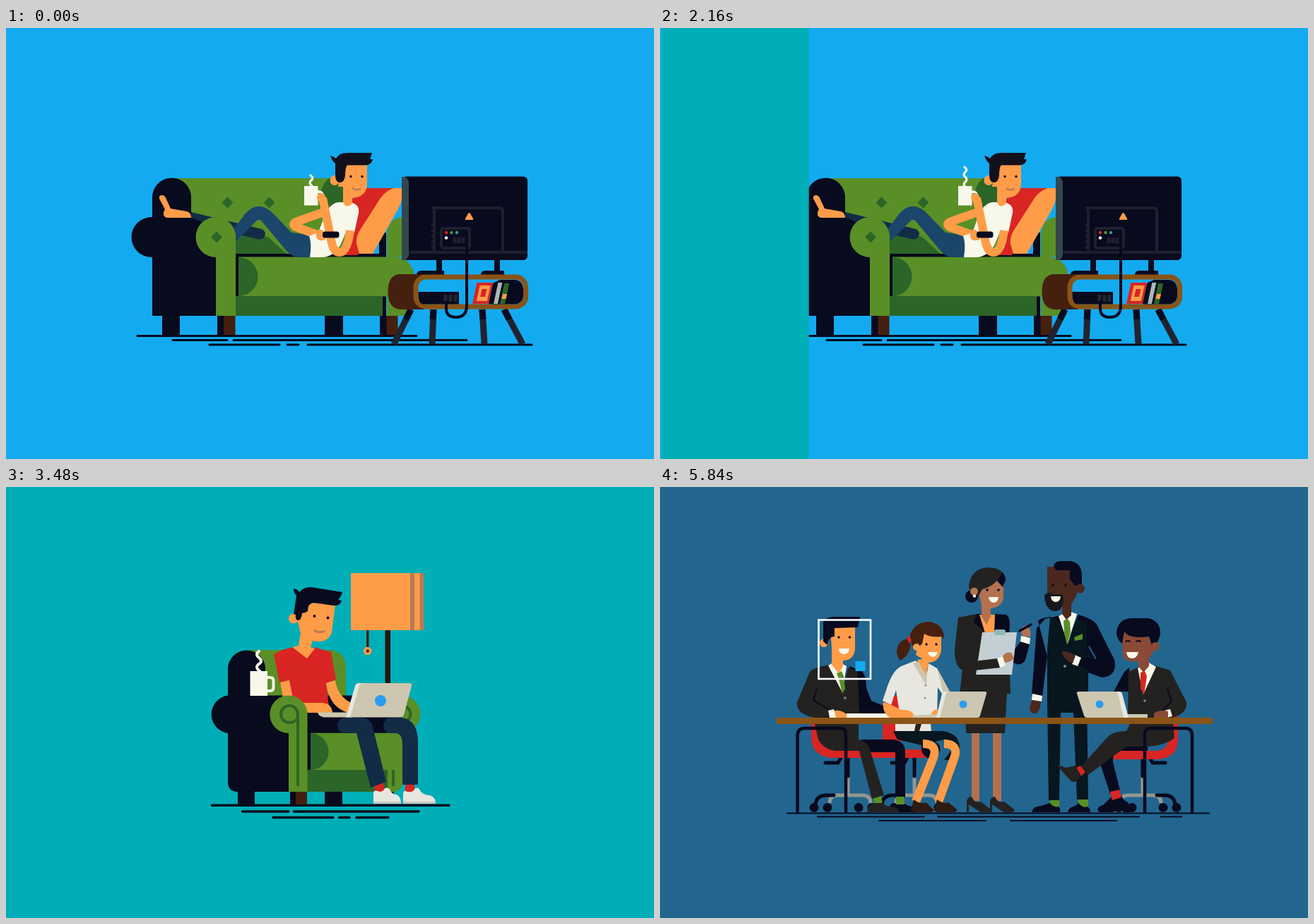
These frames come from a looping animation (917x611 px, 7960 ms). An HTML page:

```html
<!DOCTYPE html>
<html lang="en">
<head>
<meta charset="utf-8">
<title>From sofa to office</title>
<style>
html, body { margin: 0; width: 100%; height: 100%; overflow: hidden; }
svg { position: absolute; inset: 0; width: 100%; height: 100%; }
#sofa { background: #14aaf0; }
#chair { background: #00aeb8; }
#office { background: #22658f; }
.navy { fill: #080a1e; } .green { fill: #5a8f27; } .moss { fill: #2c6528; }
.skin { fill: #ff9c48; } .red { fill: #d92523; } .white { fill: #f8f8ea; }
.jeans { fill: #1a466b; } .denim { fill: #122c46; } .coal { fill: #232220; }
.brown { fill: #46200f; } .wood { fill: #8a5416; } .tan { fill: #cdc6b0; }
.pale { fill: #e7e7df; } .blue { fill: #2a9df0; } .teal { fill: #07161f; }
.umber { fill: #b4714f; } .cocoa { fill: #4a281e; } .rust { fill: #8a4a36; }
.line { fill: none; stroke: #080a1e; stroke-linecap: round; stroke-linejoin: round; }
.skinline { fill: none; stroke: #ff9c48; stroke-linejoin: round; }
.steam { fill: none; stroke: #f8f8ea; stroke-linecap: round; }
</style>
</head>
<body>

<svg id="sofa" viewBox="0 0 917 611" preserveAspectRatio="none">
  <path class="line" stroke-width="3" d="M186 436.500H581M236 442.500H313M322 442.500H652M288 449H387M398 449H414M427 449H744"/>
  <!-- sofa -->
  <path class="green" d="M235 213H455Q480 218 480 245V322H235Z"/>
  <path class="moss" d="M457 213Q441 226 444 262H482V240Q478 213 457 213Z"/>
  <path class="moss" d="M313.500 239.500l8 8-8 8-8-8ZM372.500 239.500l8 8-8 8-8-8ZM262 262L330 281 372 297 398 321H325Z"/>
  <path class="navy" d="M207 268V240a27.500 27.500 0 0 1 55 0V268ZM206 268H297V408H207V325H206a28 28 0 0 1 0-57ZM221 408h25v28h-25ZM299 408h10v28h-10ZM451 408h26v28h-26ZM529 408h10v28h-10Z"/>
  <path class="brown" d="M308.500 408h16v27h-16ZM538.500 408h16v27h-16Z"/>
  <path class="green" d="M539 408V290Q543 268 562 268H585V324L549 324a28 28 0 0 1 21 47V408Z"/>
  <path class="navy" d="M325 320H528V290H538V408H325Z"/>
  <path class="green" d="M329 324.500H549a28 28 0 0 1 0 56H329Z"/>
  <path class="moss" d="M329 325a27 27 0 0 1 0 55ZM325 380H533V408H325Z"/>
  <!-- pillows -->
  <path class="red" d="M478 322L488 244 508 227H560L530 255 498 322Z"/>
  <path class="skin" d="M560 227H549Q538 230 530 241L500 288Q495 297 496 306L500 320H519L553 260Q559 250 560 242Z"/>
  <!-- legs and feet -->
  <path class="denim" d="M262 261L362 285Q369 289 366 295 363 301 355 299L325 292 262 269Z"/>
  <path class="skin" d="M217 242Q216 237 221 237 225 237 227 243L233 256 256 260Q262 262 262 269H230Q222 269 223 261L225 257Z"/>
  <path class="jeans" d="M320 288L338 264Q357 242 378 263L404 290 433 294V325H418Q406 326 397 316L362 274Q358 269 353 275L322 306Z"/>
  <path class="green" d="M297 268a28 28 0 0 1 28 28V408H297V325a28 28 0 0 1 0-57Z"/>
  <path class="moss" d="M298 288.500l8 8-8 8-8-8Z"/>
  <!-- upper body -->
  <path class="skinline" stroke-width="12" d="M455 259L410 275Q404 278 410 282L446 295"/>
  <path class="white" d="M470 247H487Q501 250 499 262L493 290 482 287 474 306Q464 325 447 325H430Q433 306 429 295L442 290 452 263Q459 249 470 247Z"/>
  <path class="skinline" stroke-width="12" d="M487 287Q483 318 472 318 463 318 460 300L448 241"/>
  <path class="skin" d="M439 290Q440 285 446 286L452 290V300Q440 304 439 295Z"/>
  <rect class="navy" x="448" y="288.500" width="23.500" height="9" rx="3.500"/>
  <path id="sofaSteam" class="steam" stroke-width="3.200" d="M431 0q5 3.500 1 7t0 7 0 7 0 7 0 7"/>
  <path class="white" d="M422 224H441.500V251.500H422ZM441 230Q450 230 450 238L445 234H441Z"/>
  <circle class="skin" cx="446" cy="240" r="6"/>
  <!-- head -->
  <path class="skin" d="M474 194H511V223Q509 240 490 241V249Q481 257 477 247V225H470Z"/>
  <ellipse class="skin" cx="465" cy="216" rx="6.500" ry="7"/>
  <path fill="#13101d" d="M459 181Q464 182 467 185 472 176 485 177H518L515 186H519Q517 195 508 194.500H483Q480 197 480 209 479 219 472 219 466 219 466 208V192Q461 188 459 181Z"/>
  <circle class="navy" cx="488" cy="210.500" r="1.700"/><circle class="navy" cx="504" cy="210.500" r="1.700"/>
  <path fill="none" stroke="#b87858" stroke-width="2.200" d="M490 227Q497 232 502 227"/>
  <!-- television -->
  <path class="navy" d="M609 328h8v17h-8ZM691 328h8v17h-8ZM581 350Q581 344 588 344H620V350ZM672 350Q672 344 678 344H705V350Z"/>
  <rect class="navy" x="560" y="210.500" width="178" height="118.500" rx="6"/>
  <path fill="#33474d" d="M560 211H566L570 217V323L566 329H560Z"/>
  <g fill="none" stroke="#1f1f2d" stroke-width="4">
    <path d="M570 318H738M606 318V255H698Q703 255 703 260V318M602 255H612"/>
    <path stroke-dasharray="4 4" d="M604 277V316"/>
    <rect x="616" y="284" width="40" height="28" rx="3"/>
    <path stroke-width="5" d="M635 297V305M641 297V305M647 297V305"/>
  </g>
  <circle class="red" cx="623" cy="290" r="2.300"/><circle class="green" cx="630.500" cy="290" r="2.300"/>
  <circle fill="#3c91a5" cx="638" cy="290" r="2.300"/><circle class="white" cx="623" cy="297.500" r="2.300"/>
  <path class="skin" d="M654 263Q655.500 261 657 263L661 270Q662 272 659 272H652Q649 272 650 270Z"/>
  <!-- stand -->
  <g fill="none" stroke="#20232f" stroke-width="9">
    <path d="M573 399L549 448M605 399L603 448M674 399L677 448M705 399L731 448"/>
    <path stroke="#080a1e" d="M573 399L566 413M605 399L604 413M674 399L675 413M705 399L712 413"/>
  </g>
  <path class="brown" d="M556 349H592V399H560Q541 399 540.500 375 540 351 556 349Z"/>
  <rect x="580" y="353" width="155.500" height="42" rx="14" fill="#14aaf0" stroke="#8a5416" stroke-width="7"/>
  <path class="navy" d="M583.500 374H641V391.500H590Q583 391 583.500 374ZM690 361L699 357H721Q731 358 732 370V380Q731 391 720 391.500H684Z"/>
  <path d="M622 378V388M629 378V388M636 378V388" stroke="#24252e" stroke-width="5"/>
  <g transform="translate(660 391) skewX(-12)">
    <path class="red" d="M0 0V-30H23V0Z"/><path class="skin" d="M5-4V-26H20V-4Z"/><path class="red" d="M9-10V-21H16V-10Z"/>
    <path class="navy" d="M23 0V-28H30V0Z"/><path fill="#a7b8b5" d="M30 0V-30H36V0Z"/>
    <path class="navy" d="M36 0V-26H39V0Z"/><path class="moss" d="M39 0V-29H46V0Z"/><path class="skin" d="M40-7V-14H46V-7Z"/>
  </g>
  <path class="line" stroke-width="4" d="M652 310V393Q652 410 637 410 623 410 623 398V388"/>
</svg>

<svg id="chair" viewBox="0 0 917 611" preserveAspectRatio="none">
 <g class="art">
  <path class="line" stroke-width="3.500" d="M291.500 451.300H627M334.500 460H400M407.500 460H584M378 468.500H463M471.500 468.500H486M496 468.500H541"/>
  <!-- lamp -->
  <path class="skin" d="M488 122H591V203H488Z"/>
  <path fill="#b87858" d="M572 122h6v81h-6ZM585.500 122h6v81h-6Z"/>
  <path fill="#21180f" d="M536.500 203h7.500v77h-7.500Z"/>
  <path class="brown" d="M510 203h3.500v25h-3.500Z"/>
  <circle cx="511.800" cy="232.500" r="4" fill="#46200f" stroke="#ff9c48" stroke-width="3.500"/>
  <!-- armchair -->
  <path class="green" d="M345 231H457Q481 232 481 257V320H345Z"/>
  <path class="navy" d="M314 258a26.500 26.500 0 0 1 53 0V295.500H490V295H540V401H431V432H328Q314 432 314 418V349a27 27 0 0 1 0-53.500ZM328 432h24v18h-24ZM402 432h9v18h-9ZM451 432h25v18h-25Z"/>
  <path class="brown" d="M410 432h16v18h-16ZM540 432h9v14h-9Z"/>
  <path class="green" d="M560 295.500a26.500 26.500 0 0 1 0 53H561V418Q560 432 547 432H540V349H431V401H540V295Z"/>
  <path class="green" d="M431 348.500H545V402H431Z"/>
  <circle cx="561" cy="322" r="11.500" fill="none" stroke="#2c6528" stroke-width="4"/>
  <path class="moss" d="M431 349a25.500 26 0 0 1 0 52ZM426 401H540V432H426ZM546 401h4v23h-4Z"/>
  <path class="navy" d="M426 319H560V348.500H426Z"/>
  <!-- torso and arms -->
  <path class="red" d="M379 237Q393 229 407 227L425 242 436 227 460 234 467 273 453 278 458 320H405L401 274 387 277Z"/>
  <path class="skin" d="M388 277L401 274 407 306H448Q461 307 462 320H420L392 298ZM453 278L466 274Q469 296 488 306L484 320Q457 312 453 278ZM405 227L414 225 418 200 434 217 431 227 437 229 426 243Z"/>
  <!-- head -->
  <path class="skin" d="M428 164L466 166 461 206Q456 221 437 219L418 212 412 188Z"/>
  <circle class="skin" cx="407" cy="186.500" r="7"/>
  <path class="navy" d="M407 144Q413 145 415 149 422 141 432 142L476 149Q474 156 470 160L475 161Q473 169 463 168L435 164Q427 165 427 176 423 179 419 179 418 189 413 189 409 188 410 181L407 180 411 154Q407 150 407 144Z"/>
  <circle class="navy" cx="436.500" cy="183" r="2"/><circle class="navy" cx="455.500" cy="185.500" r="2"/>
  <path fill="none" stroke="#b87858" stroke-width="3" d="M436 203Q443 208 451 204"/>
  <!-- legs -->
  <path class="red" d="M521 423L534 419 536 434H523ZM565 421h13v14h-13Z"/>
  <path class="denim" d="M480 327H502Q515 327 519 340L538 418 516 426 496 349H480a11 11 0 0 1 0-22ZM545 327H560Q583 330 583 362V422H561V365Q561 349 551 349H545a11 11 0 0 1 0-22Z"/>
  <path id="shoe" class="pale" d="M520 449V434Q520 429 526 431 533 434 536 427 541 425 544 430 545 435 552 436 559 438 559 449Z"/>
  <path class="pale" d="M562 449V434Q563 429 568 432 576 434 579 427 584 425 587 432 592 437 600 437 608 440 608 449Z"/>
  <path fill="#cbc7bb" d="M520 446h39v3h-39ZM562 446h46v3h-46Z"/>
  <!-- laptop -->
  <path class="tan" d="M441 319.500H486V326.500H450Q442 325 441 319.500Z"/>
  <path class="pale" d="M481 326.500L494 282Q495 278 500 278H506L490 326.500Z"/>
  <path class="tan" d="M487 326.500L500 282Q501 278 505 278H571Q575 278 574 282L563 323Q562 326.500 558 326.500Z"/>
  <circle class="blue" cx="530" cy="303" r="8"/>
  <path class="green" d="M400 295.500a26.500 26.500 0 0 1 26.500 26.500V432H400V349a26.500 26.500 0 0 1 0-53.500Z"/>
  <path fill="none" stroke="#2c6528" stroke-width="4" d="M413 424V322a12 12 0 1 0-12 12q8 0 12-7"/>
  <path id="chairSteam" class="steam" stroke-width="4" d="M358 2q-6 4 0 9t0 9 0 9 0 7"/>
  <path class="white" d="M345.500 261H370V296H345.500Z"/>
  <path fill="none" stroke="#f8f8ea" stroke-width="4" d="M370 270H374Q378.500 270 378.500 275V284Q378.500 289 374 289H370"/>
  <use id="ghostSteam" href="#chairSteam"/>
 </g>
</svg>

<svg id="office" viewBox="0 0 917 611" preserveAspectRatio="none">
 <g class="art">
  <path class="line" stroke-width="2" d="M180 462.500H777M223 467.500H374M393 467.500H678M708 467.500H738M310 473H461M496 473H646"/>
  <!-- swivel chairs -->
  <g id="base">
    <path fill="none" stroke="#94988f" stroke-width="5" d="M266 408V436M240 448Q240 437 252 437H286Q298 437 298 448"/>
    <path class="line" stroke-width="5" d="M266 384V410M234 391H252L258 380M220 452Q220 438 234 437H246"/>
    <circle class="navy" cx="218" cy="454.500" r="6.500"/><circle class="navy" cx="237" cy="454.500" r="6.500"/>
    <circle class="navy" cx="281" cy="454.500" r="6.500"/><circle class="navy" cx="300" cy="454.500" r="6.500"/>
  </g>
  <use href="#base" transform="translate(94 0)"/>
  <use href="#base" transform="matrix(-1 0 0 1 949 0)"/>
  <path class="red" d="M214 310Q216 296 226 296H234V350Q232 372 250 372H378V384H242Q214 380 214 355ZM315 358V310Q320 296 332 296H342V360ZM733 310Q732 297 722 296V350Q720 372 704 374H644Q634 377 638 386H705Q733 383 733 358Z"/>
  <!-- man at the left -->
  <path class="navy" d="M268 254L286 261Q292 268 292 285L299 303 326 314V327H276ZM285 358H330Q347 360 347 376V441H333V376H285ZM325 461Q325 451 334 449H347Q350 453 360 453 372 454 373 461Z"/>
  <path class="green" d="M302 439L313 436 315 451H303ZM334 439h12v11h-12Z"/>
  <path class="coal" d="M219 336H281V358Q294 360 298 375L317 437 300 442 282 374H248Q232 372 224 358ZM293 461Q294 451 302 448H314Q320 453 328 453 338 454 339 461ZM212 262Q216 256 240 252L258 290 266 256 280 262 282 327H219Q192 322 194 305Z"/>
  <path fill="none" stroke="#080a1e" stroke-width="2" d="M222 286L217 302 238 315"/>
  <path class="white" d="M238 253L250 246 264 254 258 291Z"/>
  <path class="green" d="M250 264L257 261 260 268 262 286 258 293 253 272Z"/>
  <path class="skin" d="M241 199H276V230Q274 246 259 246V254L253 264 243 252V230ZM244 318Q254 314 264 322V327H244Z"/>
  <circle class="skin" cx="232" cy="221" r="6"/>
  <path class="navy" d="M231 191Q236 184 247 184H283L280 199 247 200V212Q238 212 237 224L231 219Z"/>
  <circle class="navy" cx="253" cy="213" r="1.800"/><circle class="navy" cx="268.500" cy="213" r="1.800"/>
  <path class="white" d="M253 229H268Q267 237 260 237 254 237 253 229ZM238 317L246 315 249 327H240ZM264 321H332V327H264Z"/>
  <circle cx="262" cy="299" r="2" fill="#777"/>
  <!-- seated woman -->
  <path class="skinline" stroke-width="12" d="M402 364Q424 364 416 385L394 446M372 364Q395 364 386 386L362 446"/>
  <path class="teal" d="M330 346H400Q424 349 424 370 423 387 402 387L413 372Q412 360 402 358L370 366 336 358Z"/>
  <path class="navy" d="M370 366Q378 360 386 360 398 364 396 374L391 387Q374 386 370 374Z"/>
  <path class="skinline" stroke-width="12" d="M372 364Q395 364 386 386L362 446M402 364Q424 364 416 385L394 446"/>
  <path fill="#2d1a10" d="M355 459L359 443Q368 450 375 447L387 457Q388 461 382 461H362ZM388 459L392 443Q402 450 408 447L420 457Q421 461 415 461H395Z"/>
  <path class="pale" d="M333 336H383L384 346H333ZM344 253L362 246 377 268 380 250 392 257 411 292 402 297 393 284 392 327H340L334 288 327 309 315 303 322 282Q331 257 344 253Z"/>
  <path class="coal" d="M362 336h8l-3 10h-7Z"/>
  <path class="tan" d="M358 250L366 247 378 262 377 282ZM392 257L397 266 411 292 402 297Z"/>
  <path class="skin" d="M316 305L327 309 342 316Q359 315 360 327H325Q314 319 316 305ZM384 321Q386 315 395 315V327H384ZM364 245L378 243 380 250 376 266Z"/>
  <path class="skin" d="M370 206H398V232Q395 248 380 249L362 238Z"/>
  <path class="brown" d="M354 209Q361 191 381 191 402 194 402 215L398 212Q384 214 374 208L371 222 363 230Q354 226 354 209ZM351 215Q337 217 335 232 335 241 340 246 352 240 355 224Z"/>
  <path class="red" d="M349 214l3-3 4 6-3 5Z"/>
  <circle class="skin" cx="363" cy="227" r="5"/>
  <circle class="navy" cx="377" cy="223" r="1.700"/><circle class="navy" cx="391" cy="223" r="1.700"/>
  <path class="white" d="M379 234H393Q391 241 386 241 380 240 379 234Z"/>
  <circle cx="376" cy="281" r="1.600" fill="#999"/><circle cx="375" cy="299" r="1.600" fill="#999"/>
  <!-- standing woman -->
  <path class="umber" d="M441 347H452V445H441ZM471 347H483V445H471Z"/>
  <path id="heel" class="coal" d="M434 461V446Q435 439 441 439 445 449 454 446L468 457Q470 461 464 461H453Q443 454 437 450V461Z"/>
  <use href="#heel" x="33"/>
  <path class="coal" d="M431 290H491L488 349H433ZM422 185L448 180 462 206 476 181 492 184 496 293H424L428 258Q417 250 417 230Z"/>
  <path class="navy" d="M474 180L490 181Q495 184 495 195L494 212 500 233 510 219 523 223 517 245Q512 253 505 251L490 245 462 206ZM448 180L444 192 462 207 455 180Z"/>
  <path class="skin" d="M452 181L474 181 473 207H460Z"/>
  <path class="umber" d="M449 140L486 132V156Q485 170 468 172V183L462 195 455 183V168Z"/>
  <path class="navy" d="M470 115Q489 118 489 132L485 142 478 134Z"/>
  <circle class="navy" cx="441" cy="155" r="9"/>
  <path class="coal" d="M437 143Q438 116 464 114 479 114 484 121 476 140 456 145L450 156 441 148Z"/>
  <circle class="umber" cx="444.500" cy="148" r="5.500"/><circle class="white" cx="445" cy="154.500" r="2.200"/>
  <circle class="navy" cx="463" cy="146" r="1.800"/><circle class="navy" cx="479" cy="146" r="1.800"/>
  <path class="white" d="M465 156H479Q478 164 472 164 466 163 465 156ZM511 211L524 214 523 223 510 219Z"/>
  <path fill="#c3cfd2" d="M456 206H505L498 266H447Z"/>
  <rect fill="#8fb9b9" x="473" y="202" width="16" height="8" rx="3"/>
  <path class="coal" d="M417 232Q417 262 436 261L482 256 478 243 444 247 440 215Z"/>
  <path class="white" d="M477 243L485 240 489 253 481 256Z"/>
  <path class="umber" d="M485 240Q490 233 497 235L501 243Q497 248 488 249ZM510 204Q512 197 519 196 526 202 524 212H514Z"/>
  <path class="line" stroke-width="3.500" d="M509 204L525 195"/>
  <!-- standing man -->
  <path class="green" d="M552 441h13v14h-13ZM592 441h14v14h-14Z"/>
  <path class="navy" d="M526 461Q527 453 539 452L552 448Q557 455 564 453 567 456 566 461ZM577 461Q578 454 588 452L592 448Q599 456 605 453 609 456 609 461Z"/>
  <path class="teal" d="M548 300H604L606 443H590L585 320H567L565 444H550Z"/>
  <path class="navy" d="M535 190Q537 186 552 184L548 303H604L603 262 625 270Q648 268 643 245L618 195Q613 187 592 181L578 215 566 182 545 187 533 200 526 294 541 297 548 240Z"/>
  <path class="teal" d="M552 184L566 190 576 222 590 188 604 190 604 232 616 245 597 241 593 254 606 260V303H548V230Z"/>
  <path fill="none" stroke="#22658f" stroke-width="2" d="M607 226L617 244"/>
  <path class="white" d="M564 183L578 176 590 180 577 222ZM527 293L541 296 540 304 526 302ZM587 238L596 242 591 254 583 251Z"/>
  <path class="green" d="M571 190L576 186 580 191 581 206 576 224 572 207ZM586 213L598 208V216L587 218Z"/>
  <circle cx="573" cy="254" r="2" fill="#888"/>
  <path class="cocoa" d="M548 113H590V152Q585 162 582 166V182L575 188 569 180 569 170 548 168ZM526 302L539 304Q538 318 532 321 524 322 523 314ZM568 234Q572 230 588 239L584 250Q574 248 568 234Z"/>
  <path class="navy" d="M557 112Q558 105 568 105H580Q597 107 597 126V140H588L580 131V118H560Z"/>
  <path fill="#17161c" d="M544 153Q550 147 556 152H570Q573 164 566 174 560 178 552 174 544 168 544 153Z"/>
  <circle class="cocoa" cx="594.500" cy="144" r="6.500"/>
  <circle class="navy" cx="556" cy="139" r="1.800"/><circle class="navy" cx="574" cy="139" r="1.800"/>
  <path class="white" d="M553 155H567Q566 163 560 163 554 163 553 155Z"/>
  <!-- man at the right -->
  <path class="navy" d="M690 358H645Q620 362 621 386L637 435 651 430 641 390Q640 376 652 374H690ZM619 458Q620 452 627 451L638 440 653 437Q655 444 662 447 667 454 665 461H656L652 456 640 461H622ZM664 256L657 262 642 290H664Z"/>
  <path class="red" d="M589 398L595 395 602 404 596 410ZM637 432L650 429 653 440 640 444Z"/>
  <path class="coal" d="M660 346L665 336H726L728 356Q715 366 690 368H660L606 408 596 396 632 356Q640 346 660 346ZM563 396Q567 394 574 398L588 395 596 410 589 417Q584 420 579 414ZM663 262L678 255 684 294 700 253 722 260 745 305Q747 321 725 327H662Z"/>
  <path fill="none" stroke="#080a1e" stroke-width="2" d="M718 286L724 304 712 316"/>
  <path class="white" d="M676 257L690 248 702 255 684 294ZM714 317L722 315 725 325 717 327Z"/>
  <path class="red" d="M680 263L686 261 689 268 685 294 680 286Z"/>
  <path class="rust" d="M653 200H700V228Q696 240 692 242V254L684 263 677 254V247Q660 249 655 240ZM699 321Q706 315 719 318V327H699Z"/>
  <path class="navy" d="M646 206Q648 186 669 186H690Q708 189 708 208 706 221 697 227L692 212Q664 216 657 205L654 222Q646 216 646 206Z"/>
  <circle class="rust" cx="701" cy="226" r="6"/>
  <path class="line" stroke-width="1.800" d="M659 219q3-2 6 0M674 219q3-2 6 0"/>
  <path class="white" d="M660 234H677Q675 243 668 243 661 243 660 234Z"/>
  <circle cx="686" cy="303" r="1.800" fill="#888"/>
  <!-- laptops and table -->
  <path class="tan" d="M357 324L392 322V327H357ZM660 322H690V327H660Z"/>
  <path class="pale" d="M391 327L399 293Q400 290 404 290H408L400 327ZM643 290H650Q653 290 654 293L663 327H652Z"/>
  <path class="tan" d="M396 327L405 293Q406 290 409 290H460Q463 290 462 293L453 324Q452 327 449 327ZM656 327L648 293Q647 290 644 290H592Q589 290 590 293L600 324Q601 327 604 327Z"/>
  <circle class="blue" cx="429" cy="308" r="5.500"/><circle class="blue" cx="622" cy="308" r="5.500"/>
  <path class="line" stroke-width="4.500" d="M194.500 460V352Q195 342 205 342H256Q263 342 263 352V460M686 460V352Q686 342 693 342H743Q753 342 753 352V460"/>
  <path class="wood" d="M165 327H782V336H165Z"/>
  <g id="focus">
    <rect x="224.500" y="188.500" width="73.500" height="83.500" fill="none" stroke="#fff" stroke-width="2.600"/>
    <rect x="276.500" y="247" width="14" height="14" fill="#14aaf0"/>
  </g>
 </g>
</svg>

<script>
const LOOP = 7960;
const WIPE = 680;
const byId = id => document.getElementById(id);
const clamp = v => Math.min(1, Math.max(0, v));

// cubic-bezier(1, 0, 0, 1), solved by bisection
function steepEase(x) {
  let low = 0, high = 1;
  for (let i = 0; i < 24; i++) {
    const s = (low + high) / 2;
    if (3 * s * (1 - s) ** 2 + s ** 3 < x) low = s; else high = s;
  }
  return low * low * (3 - 2 * low);
}

// Wipes a scene in from the left, then fades its artwork up.
function reveal(id, elapsed) {
  const scene = byId(id);
  const progress = steepEase(clamp(elapsed / WIPE));
  const left = 3 * (1 - progress);
  const right = 914 * (1 - progress);
  const fade = clamp((elapsed - 340) / 270);
  scene.style.visibility = elapsed > 0 ? "visible" : "hidden";
  scene.style.clipPath = `inset(0 ${right / 9.17}% 0 ${left / 9.17}%)`;
  scene.querySelector(".art").style.opacity = fade;
  return fade;
}

function draw(t) {
  byId("sofaSteam").setAttribute("transform", `translate(0 ${209 - 10 * (t / 1920) ** 1.4})`);
  byId("chairSteam").setAttribute("transform", `translate(0 ${240 - 0.0078 * (t - 2320)})`);
  byId("ghostSteam").setAttribute("opacity", 1 - reveal("chair", t - 1840));
  reveal("office", t - 4800);
  const scale = 1 + 0.13 * Math.sin(Math.PI * clamp((t - 5480) / 360));
  byId("focus").setAttribute("transform",
    `translate(261.2 230.3) scale(${scale}) translate(-261.2 -230.3)`);
}

const start = performance.now();
function tick() {
  draw((performance.now() - start) % LOOP);
  requestAnimationFrame(tick);
}
tick();
</script>
</body>
</html>
```
